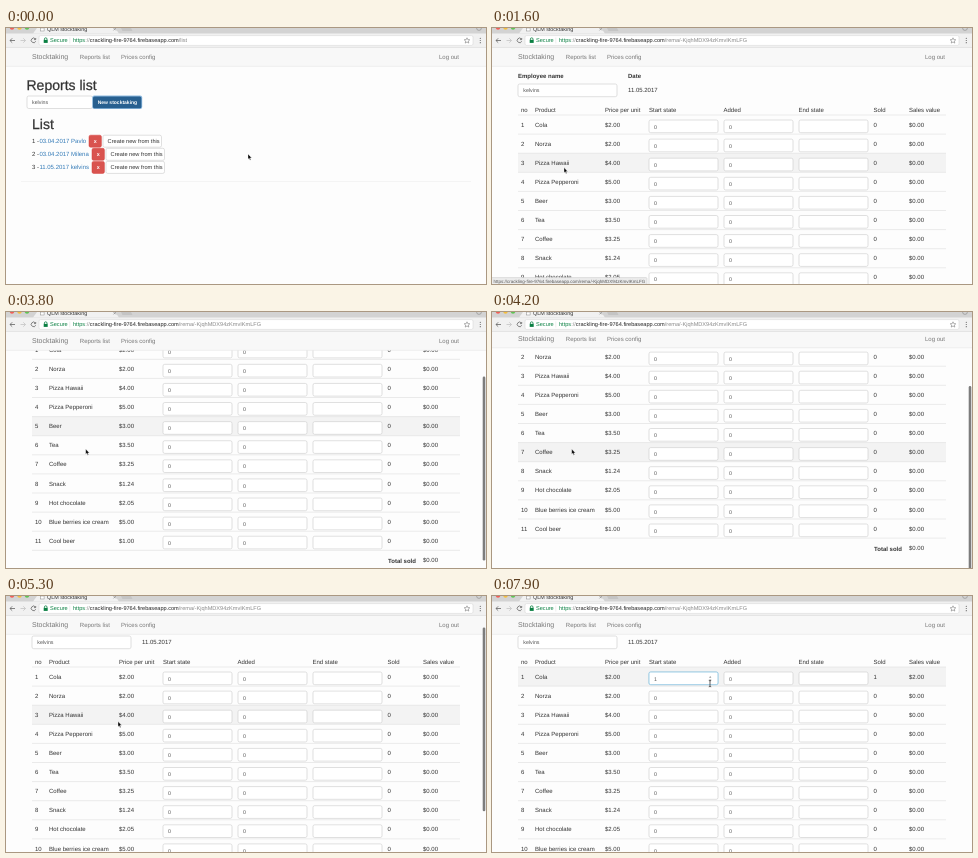
An HTML page that plays this animation: 480x256 px, repeating every 8000 ms.

```html
<!DOCTYPE html>
<html lang="en">
<head>
<meta charset="utf-8">
<title>Stocktaking</title>
<style>
  html, body { margin: 0; width: 100%; height: 100%; overflow: hidden; background: #fff; }
  svg { display: block; width: 480px; height: 256px; }
  text { font: 6px "Liberation Sans", Arial, sans-serif; fill: #333; white-space: pre; text-rendering: geometricPrecision; }
  .b { font-weight: bold; }
  .nav { fill: #777; }
  .brand { font-size: 7px; fill: #777; }
  .h { font-size: 14px; stroke: #333; stroke-width: .25px; }
  .in { font-size: 5.3px; fill: #555; }
  .btn { font-size: 5.65px; }
  .link { fill: #337ab7; }
  .link.on { fill: #23527c; text-decoration: underline; }
  .url { font-size: 5.6px; fill: #888; }
  .green { fill: #0b8043; }
  .host { fill: #222; }
  .small { font-size: 4.52px; fill: #555; }
  .field { fill: #fff; stroke: #ccc; stroke-width: .6px; }
  .line { stroke: #ddd; stroke-width: .6px; }
</style>
</head>
<body>
<svg id="stage" viewBox="0 0 480 256"></svg>
<script>
const LOOP = 8000, OPEN = 1400, FOCUS = 5900, TYPED = 7800;
const PITCH = 19.1, VIEW = 237, MAX_SCROLL = 68.5;
const HOST = 'crackling-fire-9764.firebaseapp.com';
const REPORT = '/rema/-KjqhMDX94zKmvIKmLFG';
const USER = 'kelvins';
const products = [
  ['Cola', 2], ['Norza', 2], ['Pizza Hawaii', 4], ['Pizza Pepperoni', 5],
  ['Beer', 3], ['Tea', 3.5], ['Coffee', 3.25], ['Snack', 1.24],
  ['Hot chocolate', 2.05], ['Blue berries ice cream', 5], ['Cool beer', 1]
];

const text = (x, y, s, cls = '', id = '') => `<text x="${x}" y="${y}" class="${cls}" id="${id}">${s}</text>`;
const rect = (x, y, w, h, attrs) => `<rect x="${x}" y="${y}" width="${w}" height="${h}" ${attrs}/>`;
const field = (x, y, w, h = 12.7) => rect(x, y, w, h, 'rx="1.7" class="field"');
const line = (x1, x2, y) => `<path d="M${x1} ${y}H${x2}" class="line"/>`;
const money = n => '$' + n.toFixed(2);

function homePage() {
  const reports = [['03.04.2017 Pavlo', 83], ['03.04.2017 Milena', 86], ['11.05.2017 ' + USER, 86]];
  return text(20.5, 62, 'Reports list', 'h')
    + field(21, 68, 65.5, 12.5) + text(26, 76.2, USER, 'in')
    + rect(86.2, 67.6, 50, 13.4, 'rx="2" fill="#8db9df"')
    + rect(87, 68.4, 48.4, 11.8, 'rx="1.5" fill="#286090"')
    + text(91.7, 76.2, 'New stocktaking', 'b', 'create')
    + text(26, 101, 'List', 'h')
    + reports.map(([label, x], i) => {
        const y = 113 + 13.1 * i;
        return text(26, y + 2.1, `${i + 1} -`)
          + text(33.4, y + 2.1, label, 'link', 'report' + i)
          + rect(x, y - 5.8, 12.4, 12, 'rx="1.6" fill="#d9534f" stroke="#d43f3a" stroke-width=".5"')
          + `<text x="${x + 4.7}" y="${y + 2.2}" class="b" style="fill:#fff;font-size:5.4px">x</text>`
          + field(x + 14, y - 5.8, 58.5, 12) + text(x + 18.6, y + 2.2, 'Create new from this', 'btn');
      }).join('')
    + '<path d="M15 153.5H465" stroke="#eee" stroke-width=".6"/>';
}

function sheetPage() {
  const cols = [[29, 'no'], [43, 'Product'], [113, 'Price per unit'], [157, 'Start state'],
    [231.5, 'Added'], [306.5, 'End state'], [381.5, 'Sold'], [417, 'Sales value']];
  return rect(26, 87, 428, PITCH, 'fill="#f3f3f3" id="hover"')
    + text(26, 50.2, 'Employee name', 'b') + text(136, 50.2, 'Date', 'b')
    + field(26, 56, 99) + text(31.3, 64.4, USER, 'in') + text(136, 64.4, '11.05.2017')
    + cols.map(([x, s]) => text(x, 84.2, s)).join('')
    + products.map(([name, price], i) => {
        const c = 96 + PITCH * i, y = c + 2.6;
        return line(26, 454, c - 9) + text(29, y, i + 1) + text(43, y, name) + text(113, y, money(price))
          + [157, 232, 307].map(x => field(x, c - 4, 69)).join('')
          + (i ? '' : focusRing(c))
          + text(162, c + 4.6, 0, 'in', 'start' + i) + text(237, c + 4.6, 0, 'in')
          + text(381.5, y, 0, '', 'sold' + i) + text(417, y, '$0.00', '', 'sales' + i);
      }).join('')
    + line(26, 454, 297.1)
    + text(382, 310.1, 'Total sold', 'b') + text(417, 309, '$0.00', '', 'total');
}

function focusRing(c) {
  return `<g id="focus">`
    + rect(156.4, c - 4.6, 70.2, 13.9, 'rx="2.2" fill="#deeef6"')
    + rect(157, c - 4, 69, 12.7, 'rx="1.7" fill="#fff" stroke="#78b9dc" stroke-width=".7"')
    + `<path d="M217 ${c + 1.8}l1.2 -1.7l1.2 1.7zm0 1.6l1.2 1.7l1.2 -1.7z" fill="#999"/>`
    + rect(162, c + .2, .5, 5, 'fill="#333" id="caret"') + '</g>';
}

function navbar() {
  return rect(0, 19.5, 480, 18.7, 'fill="#f8f8f8"')
    + '<path d="M0 38.3H480" stroke="#e4e4e4" stroke-width=".6"/>'
    + text(26, 31.4, 'Stocktaking', 'brand') + text(73.8, 31.2, 'Reports list', 'nav')
    + text(115, 31.2, 'Prices config', 'nav') + text(433, 31.2, 'Log out', 'nav');
}

function browser() {
  const dots = ['#f25e57', '#f5be3d', '#5fc454']
    .map((f, i) => `<circle cx="${6 + 7.5 * i}" cy="-.6" r="2.3" fill="${f}"/>`).join('');
  return rect(0, 0, 480, 19.5, 'fill="#f1f1f1"') + rect(0, 0, 480, 5.5, 'fill="#d3d3d3"')
    + dots + '<path d="M27 5.6L31 0H109L113 5.6Z" fill="#f1f1f1"/>'
    + '<path d="M115 0h10l1.5 3h-10z" fill="#c4c4c4"/>'
    + '<circle cx="473" cy="0" r="2.4" fill="none" stroke="#888" stroke-width=".6"/>'
    + rect(34.5, 0, 3.6, 3, 'fill="#fff" stroke="#888" stroke-width=".5"')
    + '<text x="41" y="2.9" style="font-size:5.4px">QLM stocktaking</text>'
    + '<path d="M107.5 0l2.4 2.4m0 -2.4l-2.4 2.4" stroke="#777" stroke-width=".6"/>'
    + rect(33, 7.6, 434, 9.8, 'rx="1.5" fill="#fff" stroke="#d0d0d0" stroke-width=".5"')
    + '<g fill="none" stroke="#666" stroke-width=".8"><path d="M9 12.5H4m2.2 -2.2l-2.2 2.2l2.2 2.2"/>'
    + '<path d="M14.5 12.5h5m-2.2 -2.2l2.2 2.2l-2.2 2.2" stroke="#c4c4c4"/>'
    + '<path d="M29.4 11a2.3 2.3 0 1 0 .3 2.2m0 -3.2v1.6h-1.7"/>'
    + '<path d="M461 9.8l.8 1.8l2 .2l-1.5 1.3l.5 2l-1.8 -1.1l-1.8 1.1l.5 -2l-1.5 -1.3l2 -.2z" stroke-width=".5"/>'
    + '<path d="M38.4 12v-.9a1.3 1.3 0 0 1 2.6 0v.9" stroke="#0b8043"/></g>'
    + rect(37.7, 11.9, 4, 3, 'fill="#0b8043"')
    + '<text x="44" y="14.4" class="url green">Secure</text>'
    + '<path d="M63.8 9.5v6" stroke="#ddd" stroke-width=".5"/>'
    + `<text x="67" y="14.4" class="url"><tspan class="green">https</tspan>://<tspan class="host">${HOST}</tspan><tspan id="path"></tspan></text>`
    + [10.3, 12.5, 14.7].map(y => `<circle cx="474.3" cy="${y}" r=".6" fill="#666"/>`).join('')
    + '<path d="M0 19.4H480" stroke="#cfcfcf" stroke-width=".5"/>';
}

const overlay = `<g id="status">${rect(-1, 249.6, 156, 8, 'rx="1" fill="#ececec" stroke="#c8c8c8" stroke-width=".5"')}`
  + text(1.5, 254.8, `https://${HOST}${REPORT}`, 'small') + '</g>'
  + rect(476.7, 0, 2.6, VIEW * VIEW / (VIEW + MAX_SCROLL), 'rx="1.3" fill="#7d7d7d" id="bar"')
  + `<g id="cursor" stroke-linejoin="round">
      <path id="arrow" d="M0 0V5.3L1.2 4.2L2 6.2L2.9 5.8L2.1 3.9H3.7Z" fill="#000" stroke="#fff" stroke-width=".4"/>
      <path id="hand" d="M-.5 .5Q0 -.4 .5 .5V2.6L3 3.2Q3.6 3.6 3.4 4.6L2.8 6.6H-.2L-1.9 4.2Q-1.6 3.3 -.5 4.2Z" fill="#fff" stroke="#000" stroke-width=".5"/>
      <path id="beam" d="M-1.2 -3.2Q0 -3.2 0 -2.4Q0 -3.2 1.2 -3.2M0 -2.4V2.4M-1.2 3.2Q0 3.2 0 2.4Q0 3.2 1.2 3.2" fill="none" stroke="#222" stroke-width=".7"/>
    </g>`;

const $ = id => document.getElementById(id);
$('stage').innerHTML = rect(0, 0, 480, 256, 'fill="#fdfdfd"')
  + `<g id="home">${homePage()}</g><g id="sheet">${sheetPage()}</g>`
  + `<g id="navbar">${navbar()}</g>` + browser() + overlay;
$('create').style.cssText = 'fill:#fff;font-size:5px';

const show = (id, on) => { $(id).style.display = on ? '' : 'none'; };
const put = (id, s) => { if ($(id).textContent !== s) $(id).textContent = s; };
const move = (id, x, y) => $(id).setAttribute('transform', `translate(${x} ${y})`);

// Eased interpolation through [time, ...values] keys
function track(keys, t) {
  const n = keys.findIndex(k => k[0] > t);
  if (n === 0) return keys[0].slice(1);
  if (n < 0) return keys[keys.length - 1].slice(1);
  const a = keys[n - 1], b = keys[n];
  const u = (t - a[0]) / (b[0] - a[0]), e = u * u * (3 - 2 * u);
  return a.slice(1).map((v, i) => v + (b[i + 1] - v) * e);
}

const scrollKeys = [[2250, 0], [3000, 28], [3250, 28], [4100, 71], [4200, 71], [4960, 16]];
const mouseKeys = [[50, 242, 126], [900, 72, 139.5], [1750, 72, 139.5], [2150, 79.7, 137], [5050, 79.7, 137], [5850, 218, 87.6]];

// While scrolling, the hovered row only updates once the page rests
function hoverRow(t, y, scroll) {
  if (t < 3200) return 2;
  if (t < 4100) return 4;
  if (t < 5000) return 6;
  return Math.max(0, Math.floor((y + scroll - 87) / PITCH));
}

function draw(t) {
  const open = t >= OPEN, typed = t >= TYPED;
  const [scroll] = track(scrollKeys, t), [x, y] = track(mouseKeys, t);
  const onLink = !open && t >= 850, inField = t >= 5750;

  show('home', !open);
  show('sheet', open);
  put('path', open ? REPORT : '/list');
  $('report2').classList.toggle('on', onLink);
  show('status', t >= 1000 && t < 2300);

  move('sheet', 0, -scroll);
  move('navbar', 0, Math.min(0, MAX_SCROLL - scroll)); // overscroll drags the fixed bar
  $('hover').setAttribute('y', 87 + PITCH * hoverRow(t, y, scroll));
  $('bar').setAttribute('y', 19 + scroll * VIEW / (VIEW + MAX_SCROLL));
  $('bar').style.opacity = t < 2300 ? 0 : 1 - Math.min(1, Math.max(0, (t - 6900) / 300));

  show('focus', t >= FOCUS);
  show('caret', !typed && (t - FOCUS) % 1000 < 500);
  put('start0', typed ? '1' : '0');
  put('sold0', typed ? '1' : '0');
  put('sales0', money(typed ? products[0][1] : 0));
  put('total', money(typed ? products[0][1] : 0));

  move('cursor', x, y);
  show('arrow', !onLink && !inField);
  show('hand', onLink);
  show('beam', inField);
}

const begin = performance.now();
function tick() {
  draw((performance.now() - begin) % LOOP);
  requestAnimationFrame(tick);
}
tick();
</script>
</body>
</html>
```
